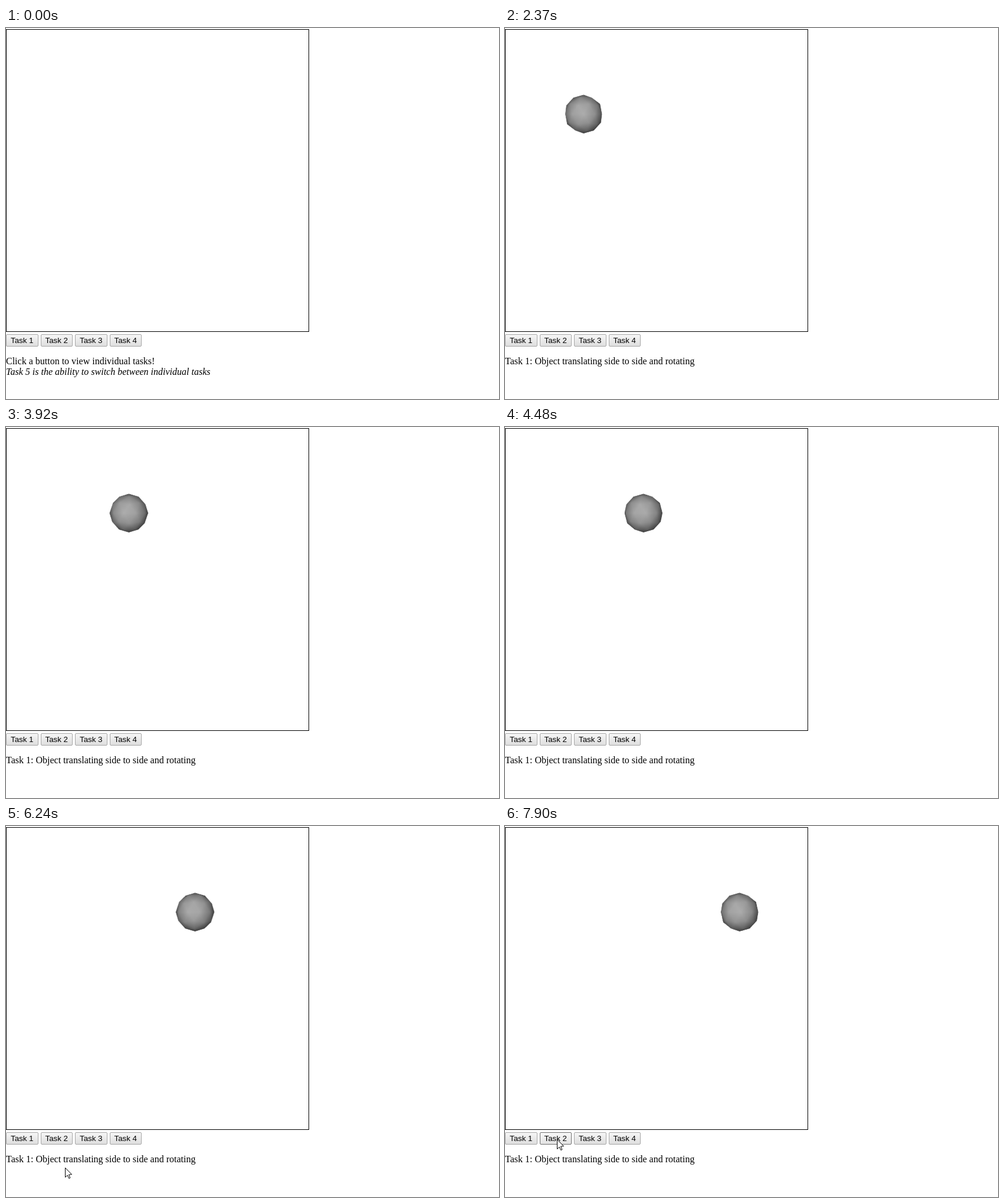
An HTML page with a canvas that plays this animation: 836 px wide and 630 px high, repeating every 8 s.

```html
<!DOCTYPE html>
<html lang="en">
<head>
<meta charset="utf-8">
<title>Tasks</title>
<style>
  html, body { margin: 0; width: 100%; height: 100%; overflow: hidden; background: #fff; }
  #stage { position: relative; width: 836px; height: 630px; overflow: hidden; color: #000;
    font: 16px/18px "Liberation Serif", "Times New Roman", serif; }
  #stage > * { position: absolute; box-sizing: border-box; }
  #frame { left: 0; top: 2px; width: 514px; height: 514px; border: 1px solid #000; }
  .button { top: 520px; width: 54.5px; height: 21px; border: 1px solid #a6a6a6; border-radius: 2px;
    background: linear-gradient(#f6f6f6, #dedede); text-align: center; white-space: nowrap;
    font: 13.333px/19px "Liberation Sans", Arial, sans-serif; }
  .button.hover { border-color: #707070; background: linear-gradient(#f8f8f8, #e2e2e2); }
  .button.down { border-color: #a0a0a0; background: linear-gradient(#dcdcdc, #f6f6f6); }
  #note { left: 0; top: 557px; white-space: nowrap; }
  canvas { left: 0; top: 0; }
</style>
</head>
<body>
<div id="stage">
  <div id="frame"></div>
  <div id="note"></div>
  <canvas id="view" width="836" height="630"></canvas>
</div>
<script>
const LOOP = 8000, STEP = 110.45, START = 500;
const PRESS = 8, RELEASE = 9;
const INTRO = 'Click a button to view individual tasks!<br>' +
  '<i>Task 5 is the ability to switch between individual tasks</i>';
const TASK = 'Task 1: Object translating side to side and rotating';

const stage = document.getElementById('stage');
const note = document.getElementById('note');
const view = document.getElementById('view');
const ctx = view.getContext('2d');

const buttons = [0, 1, 2, 3].map(i => {
  const el = document.createElement('div');
  el.className = 'button';
  el.style.left = i * 58.5 + 'px';
  el.textContent = 'Task ' + (i + 1);
  stage.insertBefore(el, view);
  return el;
});

// Keys are [tick, value...]
const ballPath = [[9, 92], [15, 123.5], [17, 133], [23, 162.5], [31, 208], [39, 250.5],
  [42, 264.7], [47, 291.5], [52, 320.3], [55, 337.5], [63, 377.5], [67, 397.5]];
const cursorPaths = [
  [[0, 82, 574], [1, 74, 567], [4, 41, 538], [5, 36, 536], [6, 35, 535],
    [9, 35, 535], [10, 36, 540], [11, 40, 556], [14, 57, 625]],
  [[49, 118, 626], [52, 100, 580], [54, 87, 560], [55, 86, 557], [58, 88, 532], [68, 88, 532]]
];

function along(keys, k) {
  const last = keys[keys.length - 1];
  if (k < keys[0][0] || k > last[0]) return null;
  const i = Math.max(1, keys.findIndex(key => key[0] >= k));
  const a = keys[i - 1], b = keys[i], f = (k - a[0]) / (b[0] - a[0]);
  return a.slice(1).map((v, n) => v + (b[n + 1] - v) * f);
}

// Once-subdivided icosahedron standing on a vertex
const unit = v => { const l = Math.hypot(...v); return v.map(c => c / l); };
const middle = (a, b) => unit(a.map((c, i) => c + b[i]));

function icosphere() {
  const ring = (y, turn) => [0, 1, 2, 3, 4].map(i => {
    const a = (turn + 72 * i) * Math.PI / 180;
    return unit([2 * Math.cos(a), y, 2 * Math.sin(a)]);
  });
  const top = [0, 1, 0], bottom = [0, -1, 0], up = ring(1, 0), low = ring(-1, 36);
  const faces = [];
  for (let i = 0; i < 5; i++) {
    const j = (i + 1) % 5;
    faces.push([top, up[i], up[j]], [up[i], up[j], low[i]],
      [up[j], low[i], low[j]], [bottom, low[i], low[j]]);
  }
  return faces.flatMap(([a, b, c]) => {
    const ab = middle(a, b), bc = middle(b, c), ca = middle(c, a);
    return [[a, ab, ca], [b, ab, bc], [c, bc, ca], [ab, bc, ca]];
  });
}

const faces = icosphere();
const RADIUS = 32.8, BOX = 72, FINE = 4, SIZE = BOX * FINE;
const LIGHT = unit([-0.12, 0.15, 0.98]);
const ball = document.createElement('canvas');
ball.width = ball.height = SIZE;
const ballCtx = ball.getContext('2d');

function spin([x, y, z], a) {
  const c = Math.cos(a), s = Math.sin(a);
  return [x * c - z * s, y, x * s + z * c];
}

function project(v) {
  const lit = Math.max(0, v[0] * LIGHT[0] + v[1] * LIGHT[1] + v[2] * LIGHT[2]);
  return { x: SIZE / 2 + v[0] * RADIUS * FINE, y: SIZE / 2 - v[1] * RADIUS * FINE, tone: 58 + 117 * lit };
}

function isFront([a, b, c]) {
  const p = b.map((v, i) => v - a[i]), q = c.map((v, i) => v - a[i]);
  const n = [p[1] * q[2] - p[2] * q[1], p[2] * q[0] - p[0] * q[2], p[0] * q[1] - p[1] * q[0]];
  return n[2] * (n[0] * a[0] + n[1] * a[1] + n[2] * a[2]) > 0;
}

function fillFace(data, a, b, c) {
  const area = (b.y - c.y) * (a.x - c.x) + (c.x - b.x) * (a.y - c.y);
  if (Math.abs(area) < 1e-6) return;
  const x0 = Math.floor(Math.min(a.x, b.x, c.x)), x1 = Math.ceil(Math.max(a.x, b.x, c.x));
  const y0 = Math.floor(Math.min(a.y, b.y, c.y)), y1 = Math.ceil(Math.max(a.y, b.y, c.y));
  for (let y = y0; y <= y1; y++) {
    for (let x = x0; x <= x1; x++) {
      const dx = x + 0.5 - c.x, dy = y + 0.5 - c.y;
      const u = ((b.y - c.y) * dx + (c.x - b.x) * dy) / area;
      const v = ((c.y - a.y) * dx + (a.x - c.x) * dy) / area;
      const w = 1 - u - v;
      if (Math.min(u, v, w) < -1e-6) continue;
      const i = (y * SIZE + x) * 4;
      data[i] = data[i + 1] = data[i + 2] = u * a.tone + v * b.tone + w * c.tone;
      data[i + 3] = 255;
    }
  }
}

function drawBall(x) {
  const angle = (36 - 2.19 * (x - 133)) * Math.PI / 180;
  const image = ballCtx.createImageData(SIZE, SIZE);
  for (const face of faces) {
    const turned = face.map(v => spin(v, angle));
    if (isFront(turned)) fillFace(image.data, ...turned.map(project));
  }
  ballCtx.putImageData(image, 0, 0);
  ctx.imageSmoothingQuality = 'high';
  ctx.drawImage(ball, x + 0.3 - BOX / 2, 146.2 - BOX / 2, BOX, BOX);
}

function drawCursor(x, y) {
  const shape = [[0, 0], [0, 16], [3.7, 12.6], [6.3, 18], [8.4, 17], [6, 11.6], [11, 11.2]];
  ctx.beginPath();
  shape.forEach(([dx, dy]) => ctx.lineTo(Math.round(x) + 0.5 + dx, Math.round(y) + 0.5 + dy));
  ctx.closePath();
  ctx.fillStyle = '#fff';
  ctx.fill();
  ctx.strokeStyle = '#000';
  ctx.lineWidth = 1;
  ctx.stroke();
}

function render(k) {
  ctx.clearRect(0, 0, view.width, view.height);
  note.innerHTML = k < RELEASE ? INTRO : TASK;

  const place = along(ballPath, k);
  if (place) drawBall(place[0]);

  const tip = along(cursorPaths[0], k) || along(cursorPaths[1], k);
  buttons.forEach((el, i) => {
    const over = tip && tip[1] >= 520 && tip[1] < 541 &&
      tip[0] >= i * 58.5 && tip[0] < i * 58.5 + 54.5;
    el.classList.toggle('hover', !!over);
    el.classList.toggle('down', !!over && k === PRESS);
  });
  if (tip) drawCursor(...tip);
}

let shown = null;
function loop() {
  const t = performance.now() % LOOP;
  const k = t < START ? -1 : Math.min(67, Math.floor((t - START) / STEP + 0.15));
  if (k !== shown) render(shown = k);
  requestAnimationFrame(loop);
}
loop();
</script>
</body>
</html>
```
